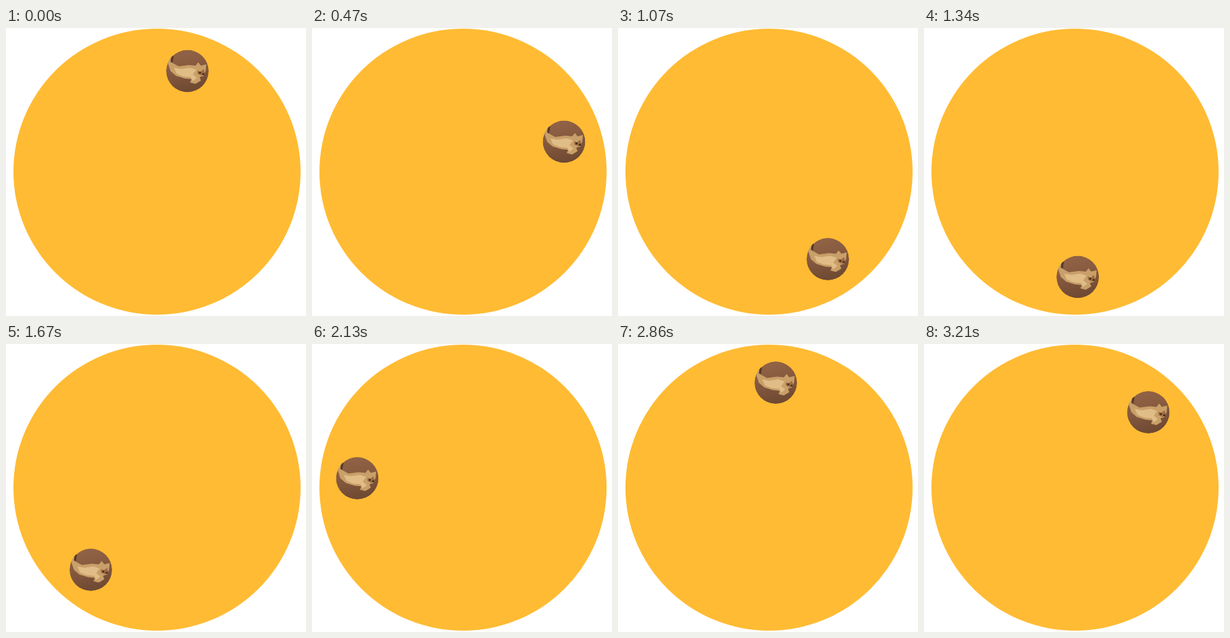
These frames come from a looping animation (444x428 px, 3.28 s). An HTML page:

```html
<!DOCTYPE html>
<html lang="en">
<head>
<meta charset="utf-8">
<title>Orbit</title>
<style>
html, body { margin: 0; width: 100%; height: 100%; overflow: hidden; background: #fff; }
svg { display: block; }
</style>
</head>
<body>
<svg width="444" height="428" viewBox="0 0 444 428">
  <defs>
    <linearGradient id="ground" x1="0" y1="0" x2=".25" y2="1">
      <stop offset="0" stop-color="#946548"/>
      <stop offset=".5" stop-color="#875a3f"/>
      <stop offset="1" stop-color="#704a33"/>
    </linearGradient>
    <clipPath id="disc"><circle r="31.5"/></clipPath>
  </defs>
  <circle cx="223.5" cy="213.5" r="212.5" fill="#fb3"/>
  <g id="ball" clip-path="url(#disc)">
    <circle r="31.5" fill="url(#ground)"/>
    <path d="M-29 -12L-24 -24L-20 -23L-22 -12L-13 -7L2 -9L12 -8L16 -13L20 -8L28 -10L27 0L24 7L18 9L20 14L12 19L4 17L6 12L-4 11L-17 7L-25 0Z" fill="#c99f69"/>
    <path d="M-20 -5L-10 -3L4 -5L13 -2L8 5L14 10L8 15L5 9L-6 8L-16 4Z" fill="#e0bd87"/>
    <path d="M-24 -22L-20 -23L-22 -12L-25 -14Z" fill="#57392a"/>
    <path d="M15 -1L19 1L24 -3L26 3L21 7L15 4Z" fill="#a06d40"/>
    <path d="M17 1h3v3h-3zM22 3h3v3h-3z" fill="#4b3020"/>
  </g>
</svg>
<script>
const ball = document.getElementById("ball");
const LOOP = 3280, STEP_MS = 66.6, STEP_DEG = 8.07, START_DEG = 16.9, RADIUS = 156.5;

function draw(now) {
  // Motion advances in discrete steps and jumps back at the end of the loop.
  const step = Math.min(48, Math.floor((now % LOOP) / STEP_MS + 0.07));
  const angle = (START_DEG + step * STEP_DEG) * Math.PI / 180;
  const snap = v => Math.round(v * 2) / 2;
  const x = snap(223 + RADIUS * Math.sin(angle));
  const y = snap(213.5 - RADIUS * Math.cos(angle));
  ball.setAttribute("transform", `translate(${x} ${y})`);
}

const start = performance.now();
function tick() {
  draw(performance.now() - start);
  requestAnimationFrame(tick);
}
tick();
</script>
</body>
</html>
```
